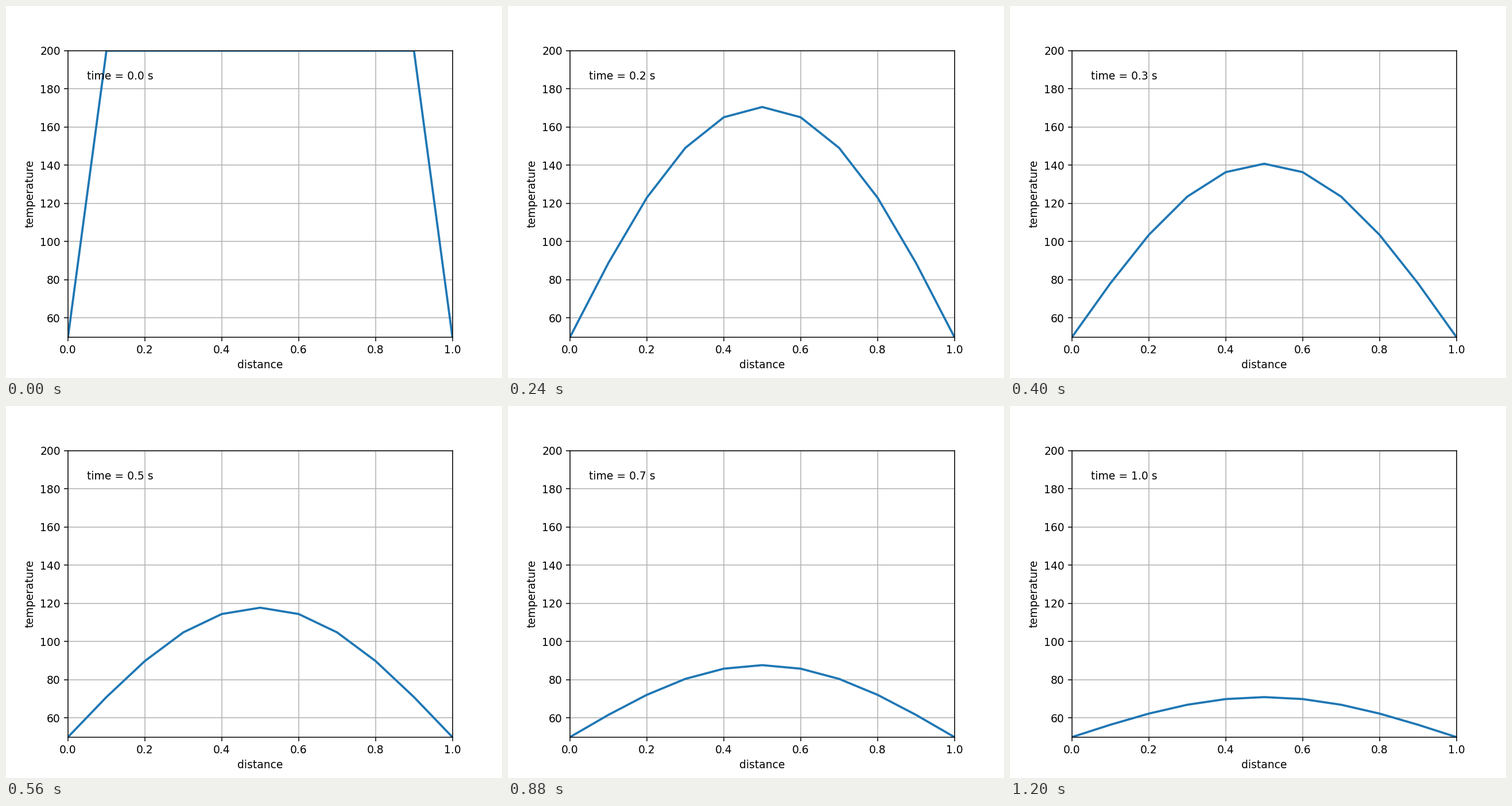
A matplotlib script for the animation above (1.24 s loop, 864 by 648 pixels).

```python
import matplotlib.pyplot as plt
import numpy as np
from matplotlib.animation import FuncAnimation

FRAMES = 31
INTERVAL = 40
DIFFUSIVITY = 0.225
EDGE, START = 50.0, 200.0
CELLS = 10

x = np.linspace(0, 1, CELLS + 1)

# Sine modes of the rod with fixed ends, on the coarse grid.
k = np.arange(1, CELLS)
modes = np.sin(np.pi * np.outer(x, k))
weights = 2 / CELLS * (START - EDGE) * modes[1:-1].sum(axis=0)
rates = DIFFUSIVITY * (2 * CELLS * np.sin(np.pi * k / (2 * CELLS))) ** 2


def temperature(t):
    return EDGE + modes @ (weights * np.exp(-rates * t))


plt.rcParams["font.family"] = "DejaVu Sans"
fig, ax = plt.subplots(figsize=(6.4, 4.8), dpi=135)
ax.set(xlim=(0, 1), ylim=(EDGE, START), xlabel="distance", ylabel="temperature")
ax.grid()
line, = ax.plot([], [], lw=2, color="#1f77b4")
label = ax.text(0.05, 0.9, "", transform=ax.transAxes)


def update(i):
    t = i / (FRAMES - 1)
    line.set_data(x, temperature(t))
    label.set_text(f"time = {t:.1f} s")
    return line, label


anim = FuncAnimation(fig, update, frames=FRAMES, interval=INTERVAL,
                     repeat=True, repeat_delay=0, blit=False)
plt.show()
```
